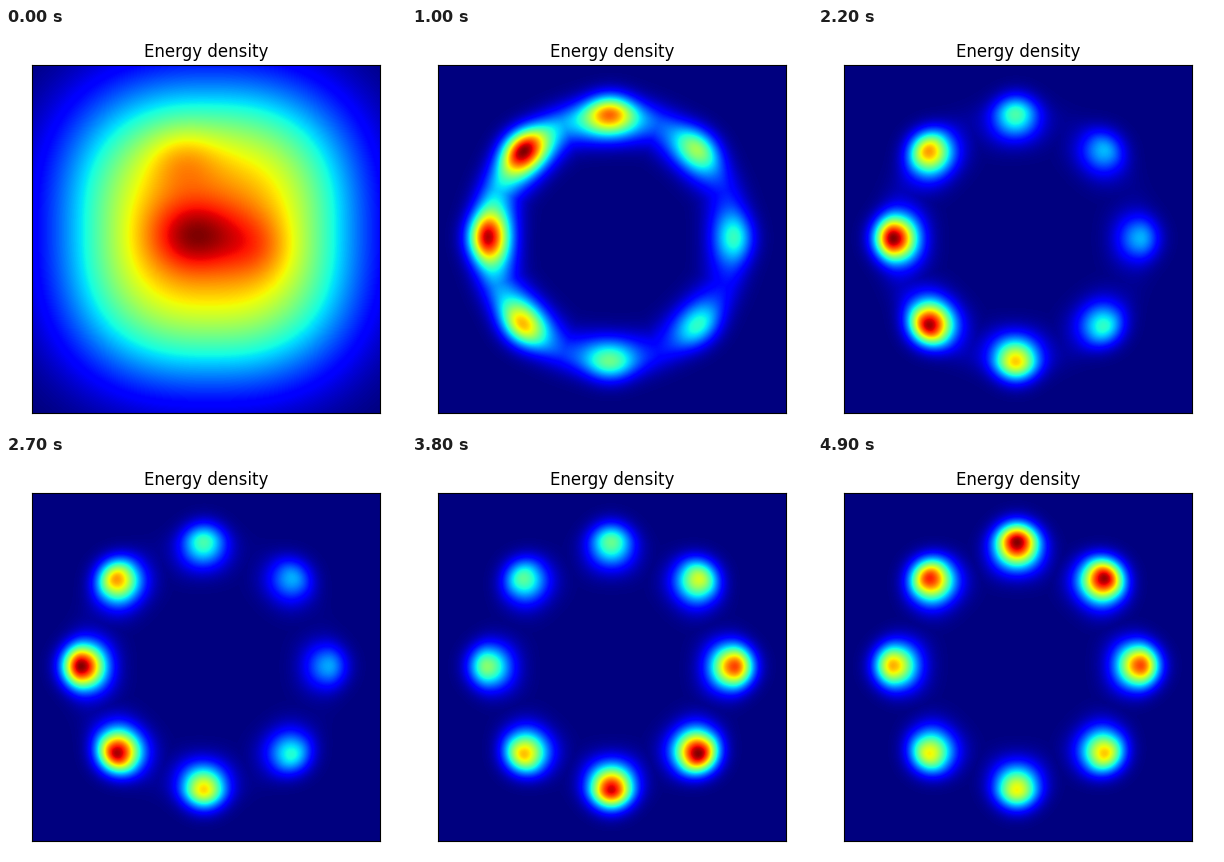
Recreate the animation shown at these times as a matplotlib script. Size 400 by 400 pixels, loop 5000 ms.

```python
import numpy as np
import matplotlib.pyplot as plt
from matplotlib.animation import FuncAnimation

FRAMES, INTERVAL = 50, 100
LEFT, RIGHT, TOP, BOTTOM = 26.5, 374.5, 37.5, 385.5
CENTER_X, CENTER_Y = 199.5, 210.5
MODES = 8
RING_START = 0.5
GRID = 174
FLOOR = 0.02

# The strongest mode wanders around the ring: direction in degrees,
# and how strong the opposite, weakest mode is.
KEY_TIMES = [0.5, 1.0, 1.7, 2.7, 3.8, 4.9]
HEADINGS = [255, 150, 200, 198, 305, 433]
WEAKEST = [0.55, 0.40, 0.30, 0.28, 0.46, 0.64]

xs = LEFT + (np.arange(GRID) + 0.5) * (RIGHT - LEFT) / GRID
ys = TOP + (np.arange(GRID) + 0.5) * (BOTTOM - TOP) / GRID
X, Y = np.meshgrid(xs, ys)

R = np.hypot(X - CENTER_X, Y - CENTER_Y)
THETA = np.arctan2(CENTER_Y - Y, X - CENTER_X)
STEP = 2 * np.pi / MODES
OFFSET = THETA - STEP * np.round(THETA / STEP)  # angle from the nearest mode


def gauss(d, sigma):
    return np.exp(-0.5 * (d / sigma) ** 2)


def normalize(field):
    field = field - field.min()
    return field / field.max()


def blob():
    """Broad, slightly square hill with a few smaller bumps."""
    q = 2.6
    r = (np.abs(X - 204) ** q + np.abs(Y - 203) ** q) ** (1 / q)
    field = 0.78 * np.exp(-(r / 142) ** 2.8)
    for x, y, sx, sy, height in [(190, 208, 32, 25, 0.24),
                                 (178, 130, 26, 22, 0.10),
                                 (252, 218, 24, 24, 0.10)]:
        field += height * gauss(X - x, sx) * gauss(Y - y, sy)
    return field


def ring(t):
    """Closed ring that breaks up into separate modes as it settles."""
    settle = np.exp(-(t - RING_START) / 0.65)
    heading = np.radians(np.interp(t, KEY_TIMES, HEADINGS))
    weakest = np.interp(t, KEY_TIMES, WEAKEST)

    lobe = ((1 + np.cos(THETA - heading)) / 2) ** 1.5
    strength = weakest + (1 - weakest) * lobe

    bridge = 0.65 * settle
    along = bridge + (1 - bridge) * gauss(R * np.sin(OFFSET), 15 + 6 * settle)

    u = R - (124 - 2 * settle)
    across = gauss(u, np.where(u > 0, 12.5 + settle, 17 - 3 * settle))
    return strength * along * across


START = normalize(blob())


def density(t):
    field = normalize(ring(max(t, RING_START)))
    if t < RING_START:
        s = 1 - (1 - t / RING_START) ** 2
        field = (START + FLOOR) ** (1 - s) * (field + FLOOR) ** s
    return normalize(field)


fig, ax = plt.subplots(figsize=(4, 4), dpi=100)
image = ax.imshow(density(0), cmap="jet", vmin=0, vmax=1,
                  extent=(LEFT, RIGHT, BOTTOM, TOP), interpolation="bilinear")
ax.set_title("Energy density")
ax.set_xticks([])
ax.set_yticks([])
fig.tight_layout()


def draw(frame):
    image.set_data(density(frame * INTERVAL / 1000))
    return [image]


animation = FuncAnimation(fig, draw, frames=FRAMES, interval=INTERVAL, repeat=True)
plt.show()
```
